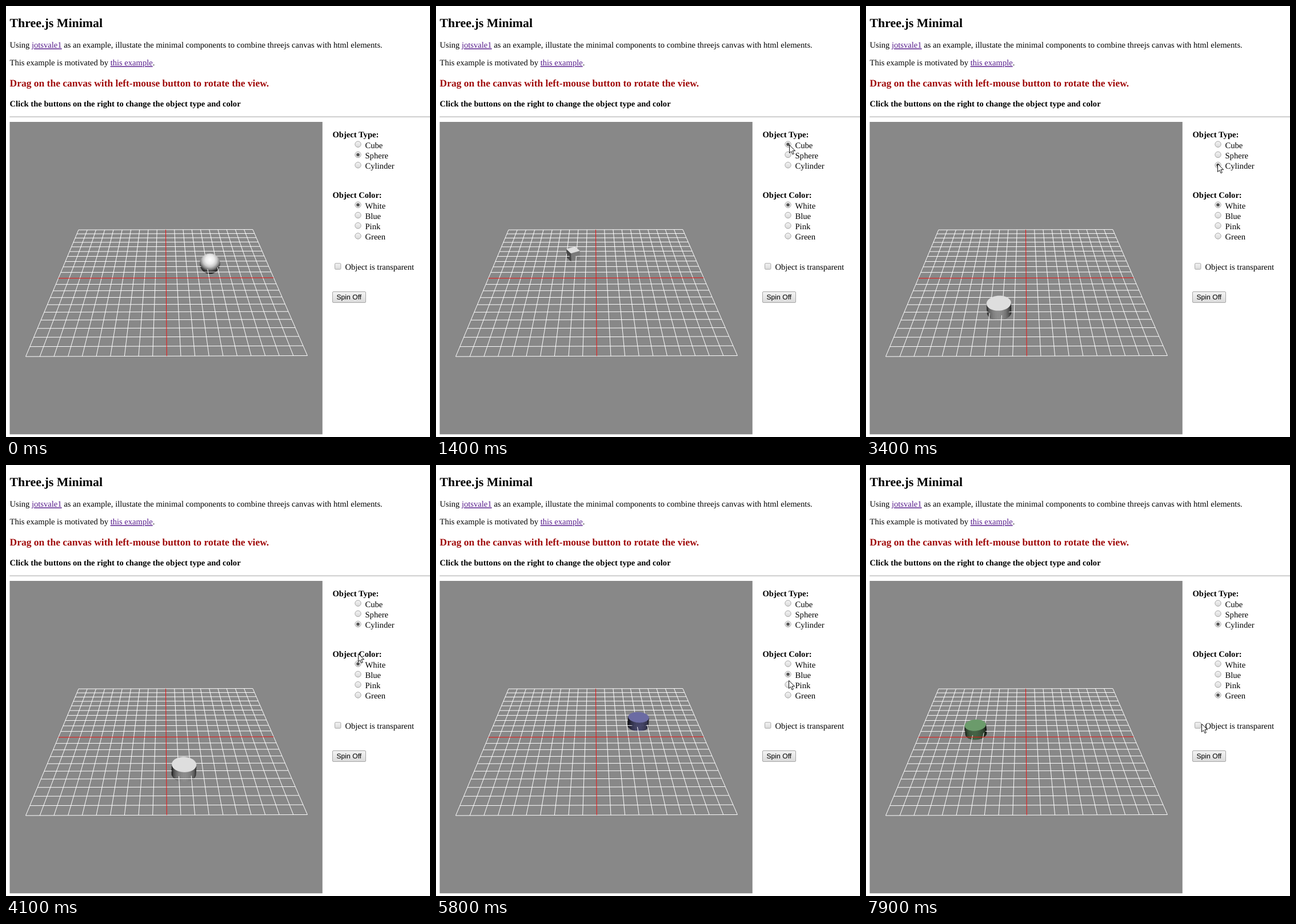
An HTML page with a canvas for the animation above (8000 ms loop, 742 by 755 pixels).

```html
<!DOCTYPE html>
<html lang="en">
<head>
<meta charset="utf-8">
<title>Three.js Minimal</title>
<style>
  html, body { margin: 0; width: 100%; height: 100%; overflow: hidden; background: #fff; }
  canvas, svg { position: absolute; left: 0; top: 0; width: 742px; height: 755px; }
  text { font: 14.59px "Liberation Serif", "Times New Roman", serif; text-rendering: geometricPrecision; }
  .bold { font-weight: bold; }
  .title { font-size: 21.9px; font-weight: bold; }
  .note { font-size: 17.49px; font-weight: bold; fill: #a00c0c; }
  .link { fill: #551a8b; text-decoration: underline; }
  .button { font: 12.16px "Liberation Sans", Arial, sans-serif; }
</style>
</head>
<body>
<canvas id="scene" width="742" height="755"></canvas>
<svg viewBox="0 0 742 755">
  <defs>
    <linearGradient id="face" x2="0" y2="1">
      <stop stop-color="#f4f4f4"/><stop offset="1" stop-color="#dadada"/>
    </linearGradient>
  </defs>
  <text class="title" x="6.5" y="37">Three.js Minimal</text>
  <text x="6.5" y="73.3">Using <tspan class="link">jotsvale1</tspan> as an example, illustate the minimal components to combine threejs canvas with html elements.</text>
  <text x="6.5" y="104.3">This example is motivated by <tspan class="link">this example</tspan>.</text>
  <text class="note" x="6.5" y="140.5">Drag on the canvas with left-mouse button to rotate the view.</text>
  <text class="bold" x="6.5" y="175.5">Click the buttons on the right to change the object type and color</text>
  <path d="M6.5 194H742" stroke="#9c9c9c"/>
  <path d="M6.5 195H742" stroke="#e4e4e4"/>
  <text class="bold" x="571.5" y="230.3">Object Type:</text>
  <text class="bold" x="571.5" y="336.2">Object Color:</text>
  <g id="radios"></g>
  <rect x="575.5" y="450.8" width="10.4" height="10.4" rx="1.5" fill="url(#face)" stroke="#a8a8a8"/>
  <text x="593.5" y="462.2">Object is transparent</text>
  <rect x="571.5" y="500.5" width="58" height="19" rx="1.5" fill="url(#face)" stroke="#a6a6a6"/>
  <text class="button" x="578.5" y="514.3">Spin Off</text>
  <path id="cursor" d="M.5 .5V14.6L3.7 11.6L6 16.8L8.3 15.8L6 10.7H10.6Z" fill="#fff" stroke="#111"/>
</svg>
<script>
const LOOP = 8000, STEP = 100, TAU = Math.PI * 2;
const ctx = document.getElementById("scene").getContext("2d");
const cursor = document.getElementById("cursor");

// Camera: looks at the origin from DIST units away, tilted down.
const CX = 280.2, CY = 476.5, FOCAL = 665, DIST = 35.3;
const SIN = 0.555, COS = 0.8318, YAW = 0.0045;
const ORBIT = 5;
const LIGHT = { top: 0.87, front: 0.55 };

// time, x, y of the pointer tip
const pointer = [
  [100, 716, 153], [200, 685, 196], [300, 667, 214], [500, 640, 233], [700, 629, 240],
  [900, 620, 235], [1300, 617, 240], [1800, 620, 256], [2200, 619, 273], [2700, 615, 275],
  [3700, 615, 277], [3900, 615, 300], [4200, 617, 345], [4500, 616, 360], [4800, 618, 366],
  [5100, 618, 367], [5400, 617, 377], [6300, 616, 377], [7100, 618, 397], [7400, 618, 398],
  [7600, 612, 420], [7900, 587, 453]
];
const shapes = [[0, "Sphere"], [1200, "Cube"], [3000, "Cylinder"]];
const colors = [[0, "White"], [5000, "Blue"], [6400, "Pink"], [7300, "Green"]];
const tints = {
  White: [255, 255, 255], Blue: [123, 123, 187], Pink: [193, 124, 147], Green: [123, 178, 123]
};

const dots = {};
function addRadios(names, top) {
  names.forEach((name, i) => {
    const y = top + i * 18.25;
    document.getElementById("radios").insertAdjacentHTML("beforeend",
      `<circle cx="616" cy="${y}" r="5.2" fill="url(#face)" stroke="#a8a8a8"/>
       <circle id="dot${name}" cx="616" cy="${y}" r="2.8" fill="#555"/>
       <text x="628.5" y="${y + 6.3}">${name}</text>`);
    dots[name] = document.getElementById("dot" + name);
  });
}
addRadios(["Cube", "Sphere", "Cylinder"], 242.2);
addRadios(["White", "Blue", "Pink", "Green"], 348.2);

const active = (table, t) => table.filter(row => row[0] <= t).pop()[1];

function pointerAt(t) {
  const i = pointer.findIndex(p => p[0] >= t);
  if (i < 1) return pointer[0];
  const a = pointer[i - 1], b = pointer[i], k = (t - a[0]) / (b[0] - a[0]);
  return a.map((v, n) => v + (b[n] - v) * k);
}

function project(x, y, z) {
  const scale = FOCAL / (DIST - z * COS - y * SIN);
  return [CX + x * scale, CY + (z * SIN - y * COS) * scale, scale];
}

function shade(tint, k) {
  return `rgb(${tint.map(c => Math.round(c * Math.min(1, Math.max(0.05, k))))})`;
}

function fillShape(points, color) {
  ctx.beginPath();
  points.forEach(p => ctx.lineTo(p[0], p[1]));
  ctx.closePath();
  ctx.fillStyle = ctx.strokeStyle = color;
  ctx.lineWidth = 0.4;
  ctx.fill();
  ctx.stroke();
}

function gridLine(x1, z1, x2, z2) {
  const a = project(x1 + YAW * z1, 0, z1 - YAW * x1);
  const b = project(x2 + YAW * z2, 0, z2 - YAW * x2);
  ctx.beginPath();
  ctx.moveTo(a[0], a[1]);
  ctx.lineTo(b[0], b[1]);
  ctx.stroke();
}

function drawGrid() {
  ctx.lineWidth = 1;
  ctx.strokeStyle = "#fff";
  for (let i = -10; i <= 10; i++) {
    if (!i) continue;
    gridLine(i, -10, i, 10);
    gridLine(-10, i, 10, i);
  }
  ctx.strokeStyle = "#f01010";
  gridLine(0, -10, 0, 10);
  gridLine(-10, 0, 10, 0);
}

// One half of an upright prism, from height y0 to y1.
function drawPrism(x, z, sides, radius, turn, y0, y1, tint) {
  const ring = Array.from({ length: sides }, (_, i) => {
    const a = turn + i / sides * TAU;
    return [x + radius * Math.cos(a), z + radius * Math.sin(a)];
  });
  ring.forEach((p, i) => {
    const q = ring[(i + 1) % sides], a = turn + (i + 0.5) / sides * TAU;
    const nx = Math.cos(a), nz = Math.sin(a);
    if (nz * (DIST * COS - p[1]) - nx * p[0] <= 0) return;
    fillShape([project(p[0], y0, p[1]), project(q[0], y0, q[1]),
      project(q[0], y1, q[1]), project(p[0], y1, p[1])], shade(tint, LIGHT.front * nz));
  });
  if (y1 > 0) fillShape(ring.map(p => project(p[0], y1, p[1])), shade(tint, LIGHT.top));
}

function drawSphere(x, z, upper, tint) {
  const [px, py, r] = project(x, 0, z);
  const glow = ctx.createRadialGradient(px, py - 0.4 * r, 0, px, py - 0.4 * r, 1.4 * r);
  [[0, 1], [0.3, 0.93], [0.5, 0.78], [0.68, 0.5], [0.8, 0.25], [1, 0]]
    .forEach(([at, k]) => glow.addColorStop(at, shade(tint, k)));
  ctx.beginPath();
  ctx.arc(px, py, r, Math.PI, upper ? TAU : 3 * Math.PI);
  if (upper) ctx.ellipse(px, py, r, r * SIN, 0, 0, Math.PI);
  ctx.fillStyle = glow;
  ctx.fill();
}

function drawObject(t, upper) {
  const angle = (30.4 + 0.0626 * t) * Math.PI / 180;
  const x = ORBIT * Math.cos(angle), z = -ORBIT * Math.sin(angle);
  const shape = active(shapes, t), tint = tints[active(colors, t)];
  const y0 = upper ? 0 : -0.5, y1 = y0 + 0.5;
  if (shape === "Sphere") drawSphere(x, z, upper, tint);
  else if (shape === "Cylinder") drawPrism(x, z, 40, 1, 0, y0, y1, tint);
  else drawPrism(x, z, 4, Math.SQRT1_2, Math.PI / 4 + (t - 1800) * 0.075 * Math.PI / 180, y0, y1, tint);
}

function render(t) {
  ctx.clearRect(0, 0, 742, 755);
  ctx.fillStyle = "#888";
  ctx.fillRect(6.5, 203, 547.3, 547.3);
  // The ground plane cuts the object at mid-height.
  drawObject(t, false);
  drawGrid();
  drawObject(t, true);

  const chosen = [active(shapes, t), active(colors, t)];
  for (const name in dots) dots[name].style.display = chosen.includes(name) ? "" : "none";

  const [, x, y] = pointerAt(t);
  cursor.style.display = t < pointer[0][0] ? "none" : "";
  cursor.setAttribute("transform", `translate(${Math.round(x)} ${Math.round(y)})`);
}

const start = performance.now();
function tick() {
  const t = (performance.now() - start) % LOOP;
  render(Math.floor(t / STEP) * STEP);
  requestAnimationFrame(tick);
}
tick();
</script>
</body>
</html>
```
